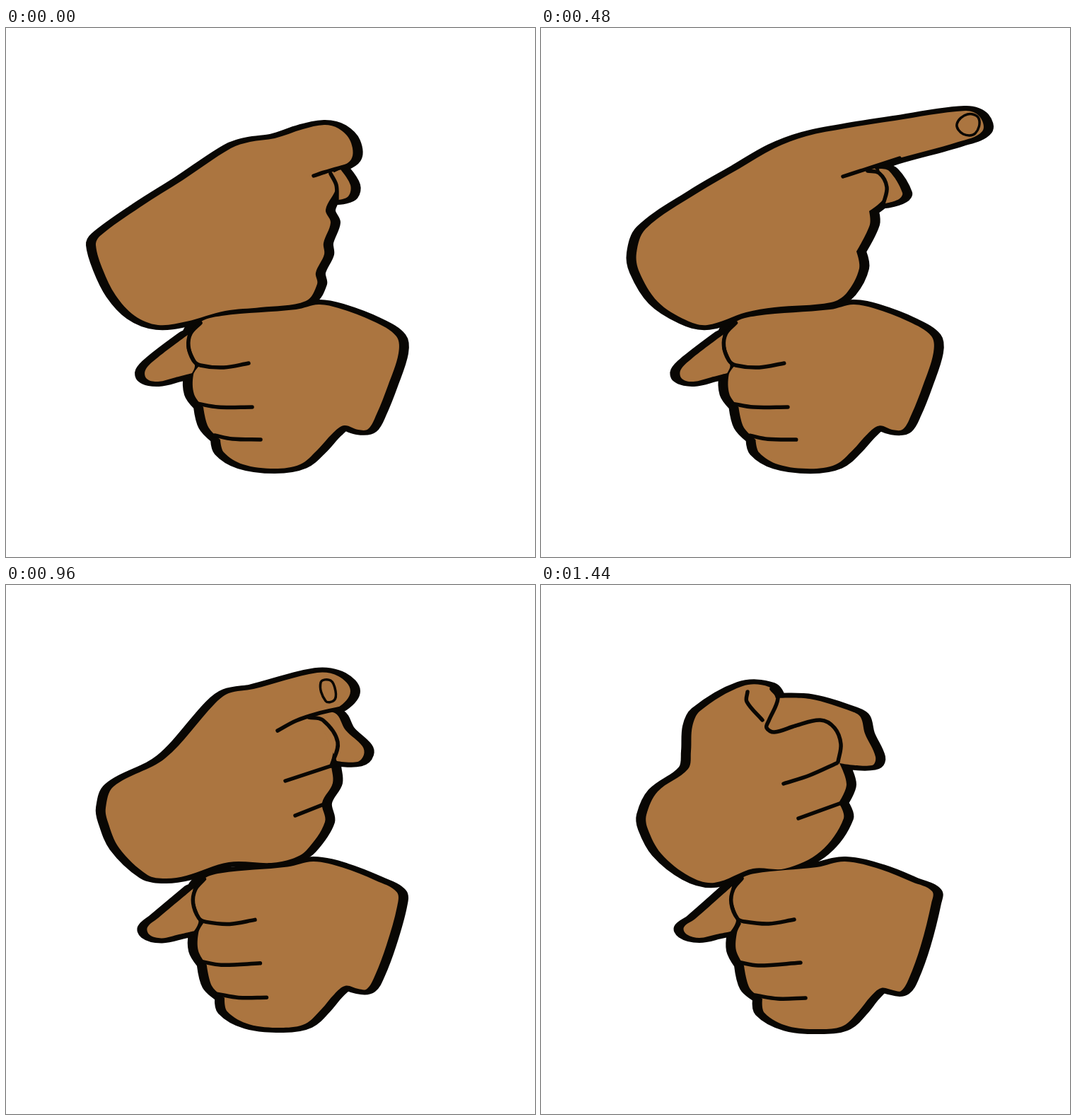
These frames come from a looping animation (748 by 748 pixels, 1.68 s). An HTML page with a canvas:

```html
<!DOCTYPE html>
<html lang="en">
<head>
<meta charset="utf-8">
<title>Hands</title>
<style>
html, body { margin: 0; width: 100%; height: 100%; overflow: hidden; background: #fff; }
canvas { display: block; width: 100vmin; height: 100vmin; }
</style>
</head>
<body>
<canvas id="c" width="748" height="748"></canvas>
<script>
const ctx = document.getElementById('c').getContext('2d');
const INK = '#090704', SKIN = '#ab7540', STEP = 240;
const NIB = { rx: 14, ry: 7 };
const poses = [];

// Points are "x,y"; a trailing "!" marks a sharp corner.
const parse = text => text.split(' ').map(s => {
  const [x, y] = s.split(',').map(parseFloat);
  return { x, y, sharp: s.endsWith('!') };
});

const mix = (a, b, k) => a.map((p, i) => ({
  x: p.x + (b[i].x - p.x) * k,
  y: p.y + (b[i].y - p.y) * k,
  sharp: p.sharp
}));

// Smooth curve through the points; handles follow the neighbours' chord.
function curve(pts, closed) {
  const n = pts.length;
  const at = i => closed ? pts[(i + n) % n] : pts[Math.max(0, Math.min(n - 1, i))];
  const handle = (i, reach) => {
    const p = at(i), a = at(i - 1), b = at(i + 1);
    if (p.sharp) return [p.x, p.y];
    const k = reach / (Math.hypot(b.x - a.x, b.y - a.y) || 1);
    return [p.x + (b.x - a.x) * k, p.y + (b.y - a.y) * k];
  };
  const path = new Path2D();
  path.moveTo(pts[0].x, pts[0].y);
  for (let i = 0; i < (closed ? n : n - 1); i++) {
    const p = at(i), q = at(i + 1);
    const reach = Math.hypot(q.x - p.x, q.y - p.y) / 3;
    path.bezierCurveTo(...handle(i, reach), ...handle(i + 1, -reach), q.x, q.y);
  }
  if (closed) path.closePath();
  return path;
}

// The lower fist drifts between two extremes.
const restFist = {
  palm: parse('260,447 272,418 305,407 410,398 442,391 470,396 520,415 552,436 555,460 540,506 524,546 512,567 498,568 478,562 462,573 440,597 416,617 380,623 335,617 308,600 303,582! 286,564 279,536! 266,518 265,490 273,478!'),
  finger: parse('257,434! 256,455 267,477 263,488! 240,494 215,500 199,496 197,484 212,468'),
  folds: [
    '275,417 261,432 258,450 265,470 275,477 308,480 343,474',
    '270,531 300,536 348,536',
    '295,576 320,581 360,582'
  ].map(parse)
};
const pushedFist = {
  palm: parse('270,442 280,418 302,408 390,399 430,391 480,402 525,420 553,433 552,450 537,510 520,557 509,574 498,573 481,570 466,582 449,603 428,623 400,628 350,624 316,605 313,585! 295,570 287,538! 276,517 277,492 283,479!'),
  finger: parse('270,426! 268,450 276,474 268,490! 248,494 224,499 206,494 202,484 218,472'),
  folds: [
    '284,415 272,430 269,450 278,472 288,476 322,479 358,473',
    '278,533 307,538 367,534',
    '302,580 335,585 374,584'
  ].map(parse)
};

function addPose(drift, hand, thumb, folds, nail) {
  const a = restFist, b = pushedFist;
  const skin = [parse(hand), mix(a.palm, b.palm, drift), mix(a.finger, b.finger, drift)];
  if (thumb) skin.push(parse(thumb));
  const lines = a.folds.map((f, i) => mix(f, b.folds[i], drift)).concat(folds.map(parse));
  poses.push({
    skin: skin.map(s => curve(s, true)),
    lines: lines.map(l => curve(l, false)),
    nail: nail && curve(parse(nail), true)
  });
}

addPose(0,
  '127,307 133,294 190,253 250,215 318,170 345,161 380,156 420,143 450,137 470,142 487,160 488,186 462,200! 467,225 452,257 459,275 449,304 450,320 438,346 440,362 424,386 360,395 310,400 255,415 215,420 182,407 155,378 137,342',
  '462,205! 473,200! 487,222 484,238 470,243!',
  ['435,209 450,204 482,195', '459,206 467,222 468,242']);

addPose(.05,
  '130,318 145,288 220,236 280,200 350,162 385,152 440,146 480,142 505,135 523,129 536,142 532,175 500,193 466,205! 472,230 457,260 460,278 436,318 438,350 432,382 400,391 320,395 250,417 215,418 180,406 150,377 133,338',
  '469,208! 480,205 495,222 490,243 473,247!',
  ['430,217 450,209 502,196', '466,208 474,222 473,248']);

addPose(.05,
  '135,318 148,284 220,234 280,199 330,170 375,153 430,142 500,131 600,117 620,125 624,146 590,161 500,186 470,197! 486,215 487,238 464,259! 465,278 446,316! 450,340 432,375 410,388 330,395 290,402 235,420 205,413 165,387 139,345',
  '478,199! 492,202 511,233 506,242 487,248!',
  ['427,210 455,201 507,184', '462,202 478,205 489,225 484,249'],
  '603,122 588,136 597,150 614,149 619,128');

addPose(.15,
  '137,318 148,284 205,254 255,220 305,182 340,160 410,146 505,127 545,128 570,146 548,168 470,190! 489,215 476,250 464,262 464,285 450,314 450,345 436,372 420,385 320,398 245,416 215,411 170,382 142,342',
  '468,197! 490,207 511,238 505,247 480,251!',
  ['408,215 440,200 500,184', '428,206 455,201 478,207 489,225 470,255', '418,281 445,267 475,254', '424,328 455,312'],
  '545,135 528,148 537,159 555,158 561,142');

addPose(.6,
  '141,315 152,285 225,245 295,168 315,153 350,147 440,124 470,129 487,150 470,173 440,183! 466,206 460,252 462,280 447,308 451,335 425,375 405,387 375,393 315,392 255,411 225,415 200,410 160,372 144,335',
  '440,184! 465,181 480,205 504,228 506,240 497,250 468,249!',
  ['384,206 410,192 440,182 475,174', '428,187 448,191 469,222 460,256', '395,277 465,254', '409,326 452,309'],
  '445,138 459,135 466,150 464,163 452,164');

addPose(.95,
  '147,315 160,290 215,250 245,185 260,166 290,155 350,132 368,139 384,163 420,174 455,182 466,195 472,215 487,243 480,254 440,252! 441,285 432,310! 438,335 405,374 350,401 300,401 235,418 205,413 165,380 149,335',
  '',
  ['335,142 336,158 358,176 377,160', '376,160 376,170 323,215! 365,202 395,194 422,203 439,235 435,250', '361,281 400,266 437,250', '382,329 436,308']);

addPose(1,
  '149,325 165,292 208,260 212,235 214,200 225,178 285,143 322,144 332,160! 380,161 440,179 452,187 458,210 473,243 468,255 422,252! 432,282 421,308! 428,330 395,377 345,401 300,401 245,421 210,412 170,380 151,345',
  '',
  ['292,151 291,165 313,191', '326,147 335,160 322,192 319,202 330,208 360,199 395,191 415,202 424,225 420,250', '343,281 380,269 418,252', '364,330 425,308']);

// Broad-nib outline: wide sideways, narrow up and down.
function ink(path) {
  const stretch = NIB.rx / NIB.ry;
  const narrow = new Path2D();
  narrow.addPath(path, new DOMMatrix([1 / stretch, 0, 0, 1, 0, 0]));
  ctx.save();
  ctx.scale(stretch, 1);
  ctx.lineWidth = NIB.ry * 2;
  ctx.stroke(narrow);
  ctx.restore();
}

function draw({ skin, lines, nail }) {
  ctx.fillStyle = '#fff';
  ctx.fillRect(0, 0, 748, 748);
  ctx.lineCap = ctx.lineJoin = 'round';
  ctx.strokeStyle = INK;
  skin.forEach(ink);
  ctx.filter = 'blur(0.7px)';
  ctx.fillStyle = SKIN;
  for (const s of skin) ctx.fill(s);
  ctx.lineWidth = 5.5;
  for (const l of lines) ctx.stroke(l);
  ctx.lineWidth = 3.5;
  if (nail) ctx.stroke(nail);
  ctx.filter = 'none';
}

const start = performance.now();
let shown = -1;
function tick() {
  const i = Math.floor((performance.now() - start) / STEP) % poses.length;
  if (i !== shown) draw(poses[shown = i]);
  requestAnimationFrame(tick);
}
tick();
</script>
</body>
</html>
```
